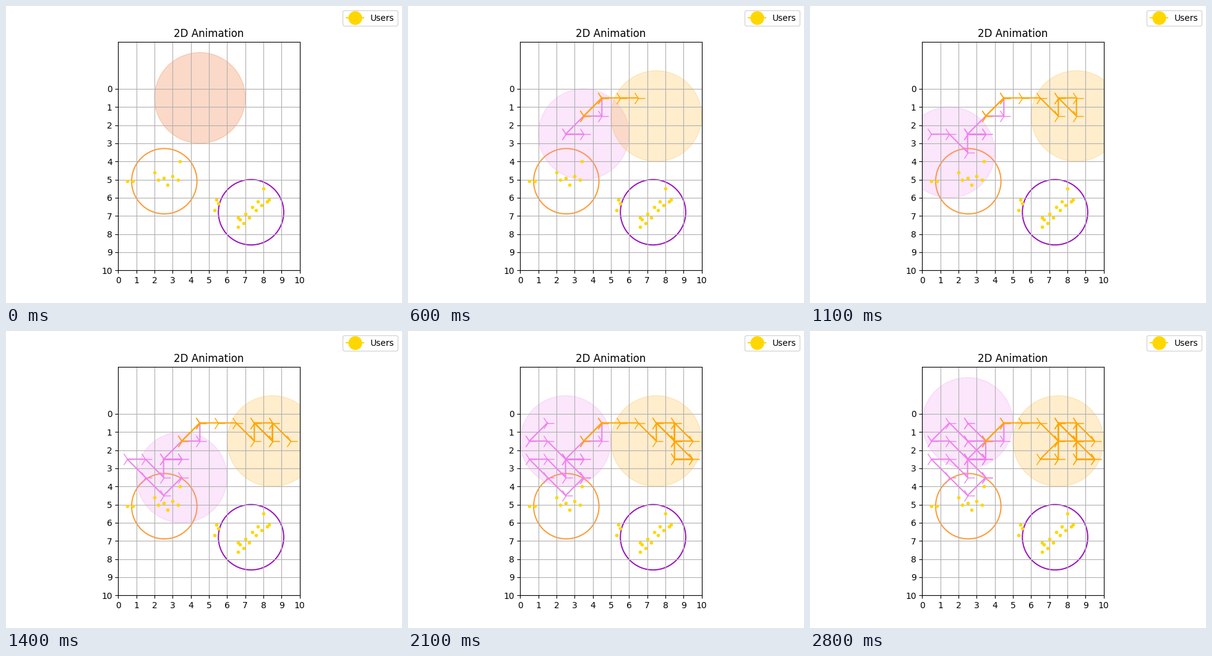
Write a matplotlib script that moves like this. It is 640 px wide and 480 px high and loops after 2.9 s.

```python
import matplotlib.pyplot as plt
import numpy as np
from matplotlib.animation import FuncAnimation
from matplotlib.lines import Line2D
from matplotlib.patches import Circle

FRAMES = 29
INTERVAL = 100
START = (4.5, 0.5)
COVER = 2.5
CLUSTER = 1.8

# Grid steps of each walker; "-" means it stays in its cell.
VIOLET_STEPS = ("S W SW E W E W S NW W SE SE NE - "
                "- NW NW W - NE SE SE N W E NW - -")
ORANGE_STEPS = ("SW - NE E E SE N SE N W SE N SE W "
                "S E W E NW - W SW E - N N - S")


def walk(steps):
    x, y = START
    path = [(x, y)]
    for step in steps.split():
        x += ("E" in step) - ("W" in step)
        y += ("S" in step) - ("N" in step)
        path.append((x, y))
    return np.array(path)


def scatter_users(ax, keys, wobble):
    """Spread users along a few (index, x, y) keys, alternating up and down."""
    at, xs, ys = zip(*keys)
    i = np.arange(at[-1] + 1)
    x = np.interp(i, at, xs)
    y = np.interp(i, at, ys) + wobble * (-1.0) ** i
    ax.plot(x.round(1), y.round(1), ".", color="gold")


class Walker:
    def __init__(self, ax, steps, color):
        self.path = walk(steps)
        self.area = ax.add_patch(Circle(START, COVER, color=color, alpha=0.2))
        self.trail, = ax.plot([], [], color=color, marker="4", markersize=16)

    def show(self, frame):
        self.area.center = self.path[frame]
        self.trail.set_data(*self.path[:frame].T)


fig, ax = plt.subplots(figsize=(6.4, 4.8), dpi=100)
ax.set_title("2D Animation", pad=5.4)
ax.set_aspect("equal")

scatter_users(ax, [(0, 0.5, 5.3), (1, 0.8, 4.9), (2, 2.0, 4.75),
                   (5, 2.7, 5.15), (7, 3.3, 4.8), (8, 3.4, 4.15)], -0.15)
scatter_users(ax, [(0, 5.3, 6.5), (2, 5.5, 6.1), (3, 6.6, 7.3), (5, 6.7, 7.4),
                   (12, 7.9, 6.2), (13, 8.0, 5.7), (15, 8.3, 6.3)], 0.2)
for center, color in (((2.54, 5.09), "#ff9933"), ((7.32, 6.8), "#9a0fc0")):
    ax.add_patch(Circle(center, CLUSTER, fill=False, edgecolor=color,
                        linewidth=1.4))

walkers = [Walker(ax, VIOLET_STEPS, "violet"),
           Walker(ax, ORANGE_STEPS, "orange")]

ax.set_xlim(0, 10)
ax.set_ylim(10, -2.6)
ax.set_xticks(range(11))
ax.set_yticks(range(11))
ax.grid(True)

key = Line2D([], [], color="gold", marker="o", markersize=15, label="Users")
fig.legend(handles=[key], loc="upper right")


def update(frame):
    for walker in walkers:
        walker.show(frame)
    return []


anim = FuncAnimation(fig, update, frames=FRAMES, interval=INTERVAL,
                     repeat=True, repeat_delay=0, blit=False)
plt.show()
```
